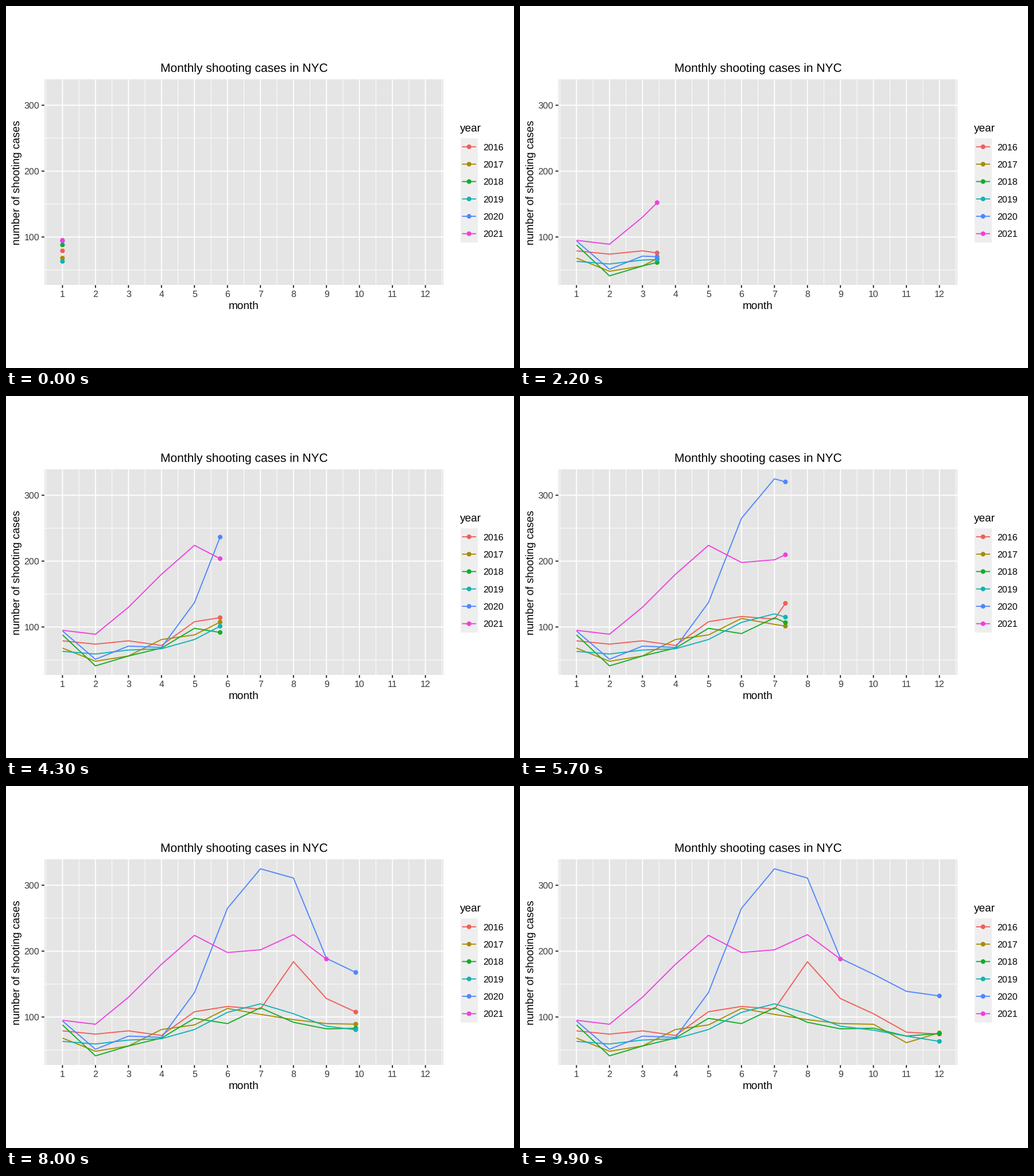
These frames come from a looping animation (885x632 px, 10 s). A matplotlib script:

```python
import numpy as np
import matplotlib.pyplot as plt
from matplotlib.animation import FuncAnimation
from matplotlib.patches import Circle, Rectangle

W, H, DPI = 885, 632, 128
FRAMES, INTERVAL = 100, 100
PT = 72 / DPI

CASES = {
    2016: [79, 74, 79, 72, 108, 116, 112, 184, 128, 105, 77, 74],
    2017: [68, 48, 56, 81, 88, 113, 104, 96, 90, 89, 61, 76],
    2018: [88, 41, 56, 68, 98, 90, 114, 92, 82, 83, 71, 75],
    2019: [63, 59, 65, 67, 81, 107, 120, 105, 86, 80, 71, 63],
    2020: [94, 51, 71, 69, 137, 265, 325, 311, 189, 165, 139, 132],
    2021: [95, 89, 130, 180, 224, 198, 202, 225, 188],
}
COLORS = ["#f25d56", "#a68d00", "#12ae2a", "#14b1b7", "#4f86ff", "#ef40de"]
PANEL, KEY, TICK, LABEL = "#e5e5e5", "#eeeeee", "#222222", "#3b3b3b"
LEFT, RIGHT, TOP, BOTTOM = 66.8, 762.4, 128.2, 487.3
THICK, THIN, RADIUS = 1.88, 0.94, 4.05

plt.rcParams.update({
    "font.family": "Liberation Sans",
    "text.hinting": "none",
    "text.hinting_factor": 1,
})


def px(month):
    return 98.4 + 57.48 * (np.asarray(month) - 1)


def py(cases):
    return 403.3 - 1.15 * (np.asarray(cases) - 100)


fig = plt.figure(figsize=(W / DPI, H / DPI), dpi=DPI, facecolor="white")
ax = fig.add_axes([0, 0, 1, 1])
ax.set_xlim(0, W)
ax.set_ylim(H, 0)
ax.axis("off")


def stroke(xs, ys, color, width, z):
    line, = ax.plot(xs, ys, color=color, lw=width * PT, zorder=z, snap=False,
                    solid_capstyle="butt", solid_joinstyle="round")
    return line


def dot(x, y, color, z):
    return ax.add_patch(Circle((x, y), RADIUS, fc=color, lw=0, zorder=z))


def text(x, y, s, size, color="black", ha="center", **kw):
    ax.text(x, y, s, fontsize=size * PT, color=color, ha=ha,
            va="baseline", **kw)


def box(x, y, w, h, color):
    ax.add_patch(Rectangle((x, y), w, h, fc=color, lw=0, zorder=0))


def draw_panel():
    box(LEFT, TOP, RIGHT - LEFT, BOTTOM - TOP, PANEL)
    for m in np.arange(0.5, 13):
        stroke([px(m)] * 2, [TOP, BOTTOM], "white", THIN, 1)
    for v in (50, 150, 250):
        stroke([LEFT, RIGHT], [py(v)] * 2, "white", THIN, 1)
    for v in (100, 200, 300):
        stroke([LEFT, RIGHT], [py(v)] * 2, "white", THICK, 2)
        stroke([LEFT - 4.85, LEFT], [py(v)] * 2, TICK, THICK, 2)
        text(58.2, py(v) + 5.6, str(v), 15.5, LABEL, "right")
    for m in range(1, 13):
        stroke([px(m)] * 2, [TOP, BOTTOM], "white", THICK, 2)
        stroke([px(m)] * 2, [BOTTOM, BOTTOM + 4.85], TICK, THICK, 2)
        text(px(m), 508, str(m), 15.5, LABEL)
    text(414.5, 114.7, "Monthly shooting cases in NYC", 21.15)
    text(414.5, 529.3, "month", 19.4)
    # The rotated label sits on a vertical baseline.
    ax.text(23.6, 307.8, "number of shooting cases", fontsize=19.4 * PT,
            rotation=90, rotation_mode="anchor", ha="center", va="baseline")


def draw_legend():
    step = 30.35
    text(791.2, 219.3, "year", 19.4, ha="left")
    box(791.5, 230.6, 30.4, 6 * step, KEY)
    for i, (year, color) in enumerate(zip(CASES, COLORS)):
        y = 230.6 + step * (i + 0.5)
        stroke([794.5, 819], [y, y], color, THICK, 3)
        dot(806.7, y, color, 4)
        text(831, y + 5.6, str(year), 15.5, ha="left")


draw_panel()
draw_legend()

series = []
for values, color in zip(CASES.values(), COLORS):
    months = np.arange(1, len(values) + 1)
    line = stroke([], [], color, THICK, 5)
    series.append((months, np.array(values), line, dot(0, 0, color, 6)))


def update(frame):
    now = 1 + 11 * frame / (FRAMES - 1)
    artists = []
    for months, values, line, tip in series:
        end = min(now, months[-1])
        value = np.interp(end, months, values)
        past = months < end
        line.set_data(px(np.append(months[past], end)),
                      py(np.append(values[past], value)))
        tip.center = px(end), py(value)
        artists += [line, tip]
    return artists


anim = FuncAnimation(fig, update, frames=FRAMES, interval=INTERVAL,
                     init_func=lambda: update(0), repeat=True,
                     repeat_delay=0, blit=False)
plt.show()
```
